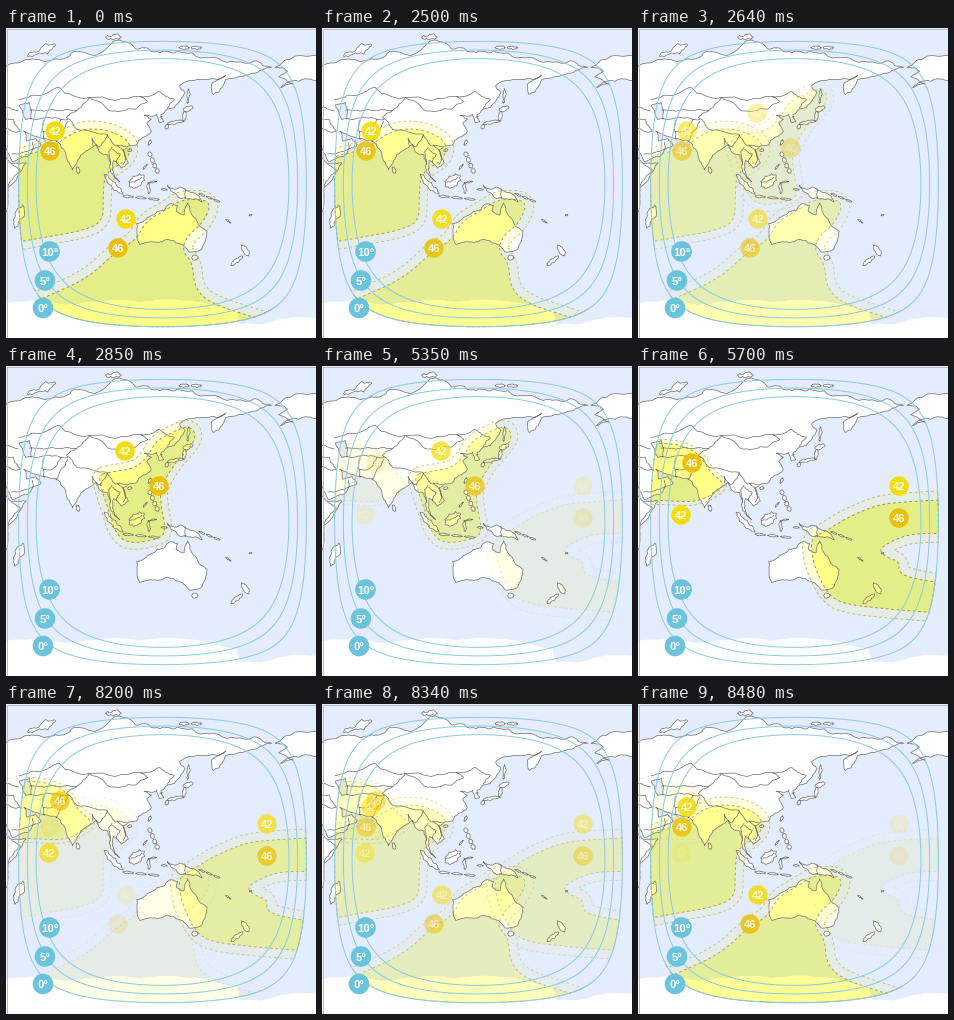
A matplotlib script for the animation above (8550 ms loop, 310 px wide and 310 px high).

```python
import numpy as np
import matplotlib.pyplot as plt
from matplotlib.animation import FuncAnimation
from matplotlib.patches import Circle, PathPatch, Rectangle
from matplotlib.path import Path

SIZE, LOOP, TICK, STEP = 310, 8550, 25, 70
CHANGES = ((2500, 1), (5350, 2), (8200, 2))     # start time, first fade step
PT = 0.72                                       # points per pixel at 100 dpi
CX, CY, SX, SY, SAT_LON = 156.5, 156, 1.77, 1.755, 128.3

SEA, COAST, RING, BLUE = "#e4edfe", "#757575", "#8ccbe2", "#6cc3dc"
# sea tint, land tint, dash colour, badge colour
OUTER = ("#e4ece4", "#ffffd8", "#c4b26c", "#f5dc00")
INNER = ("#e4ee88", "#ffff88", "#a08a3a", "#ebc000")

rng = np.random.default_rng(7)


# ---- geometry ----
def project(lon, lat):
    return np.column_stack([CX + SX * (lon - SAT_LON), CY - SY * lat])


def ring(xy):
    return Path(np.vstack([xy, xy[:1]]), closed=True)


def rim(elevation):
    """Where a geostationary satellite is seen at the given elevation."""
    el = np.radians(elevation)
    gamma = np.arccos(0.1513 * np.cos(el)) - el
    b = np.linspace(0, 2 * np.pi, 240, endpoint=False)
    lat = np.arcsin(np.sin(gamma) * np.cos(b))
    lon = np.arctan2(np.sin(gamma) * np.sin(b), np.cos(gamma))
    return project(SAT_LON + np.degrees(lon), np.degrees(lat))


HORIZON = rim(0) - (CX, CY)


def clamp(xy):
    """Pull points beyond the horizon back onto it."""
    d = xy - (CX, CY)
    limit = np.interp(np.arctan2(d[:, 1], d[:, 0]),
                      np.arctan2(HORIZON[:, 1], HORIZON[:, 0]),
                      np.hypot(*HORIZON.T), period=2 * np.pi)
    return (CX, CY) + d * np.minimum(1, limit / np.hypot(*d.T))[:, None]


def between(xy, *shares):
    nxt = np.roll(xy, -1, axis=0)
    return np.stack([xy + s * (nxt - xy) for s in shares], 1).reshape(-1, 2)


def contour(*xy):
    """Dense smooth outline through a few key pixels."""
    xy = np.reshape(xy, (-1, 2)).astype(float)
    for _ in range(2):
        xy = between(xy, 0.25, 0.75)
    return between(xy, 0, 0.25, 0.5, 0.75)


def grow(xy, d):
    """Parallel outline at distance d outside."""
    tangent = np.roll(xy, -1, axis=0) - np.roll(xy, 1, axis=0)
    normal = np.column_stack([tangent[:, 1], -tangent[:, 0]])
    normal /= np.hypot(*normal.T)[:, None]
    x, y = xy.T
    turn = np.sign(np.sum(x * np.roll(y, -1) - y * np.roll(x, -1)))
    out = xy + turn * d * normal
    gap = np.hypot(*(out[:, None] - xy[None]).transpose(2, 0, 1)).min(axis=1)
    return out[gap > 0.95 * d]


# ---- map ----
def rough(z, rounds=3, amount=0.13):
    """Fractal midpoint displacement of a complex polyline."""
    for _ in range(rounds):
        a, b = z[:-1], z[1:]
        mid = (a + b) / 2 + 1j * (b - a) * rng.uniform(-amount, amount, len(a))
        z = np.append(np.column_stack([a, mid]).ravel(), z[-1])
    return z


def on_map(z):
    lat = z.imag
    return project(z.real, lat + 0.015 * np.maximum(lat - 60, 0) ** 2)


def points(lonlat):
    return np.array(lonlat[::2]) + 1j * np.array(lonlat[1::2])


lands, borders = [], []


def land(*lonlat):
    z = points(lonlat)
    lands.append(ring(on_map(rough(np.append(z, z[0])))))


def border(*lonlat):
    borders.append(Path(on_map(rough(points(lonlat)))))


def isles(start, end, width, n=1):
    """A row of n long islands from start to end."""
    a, b = complex(*start), complex(*end)
    span = (b - a) / n
    turn = np.exp(-1j * np.linspace(0, 2 * np.pi, 9))
    half = 0.5 if n == 1 else 0.42
    for k in range(n):
        oval = span * half * turn.real + 1j * span / abs(span) * width / 2 * turn.imag
        lands.append(ring(on_map(rough(a + span * (k + 0.5) + oval, 2, 0.2))))


# Eurasia, clockwise from the White Sea
land(30, 65, 38, 65, 46, 68, 60, 69, 68, 70, 73, 70, 81, 73, 104, 77.5, 113, 74, 127, 72.5,
     140, 72.5, 160, 70, 180, 69, 190, 66, 179, 63, 164, 59.5, 162, 55, 157, 51, 156, 57,
     164, 62, 154, 59.5, 138, 56, 141, 52, 135, 43.5, 127.5, 39.7, 129, 35.5, 126.5, 35,
     125, 39.7, 118, 39, 122, 37, 119.5, 35, 122, 30, 113.5, 22.2, 106, 19.5, 109, 12,
     105, 9, 100.5, 13.4, 100, 8, 104, 1.4, 98.5, 9, 97.5, 16.5, 94.4, 17, 91, 22.5,
     82, 16.5, 80, 13, 77.5, 8, 73, 19, 67, 25, 57, 27, 50, 30, 51.5, 24.5, 56.5, 26,
     59.8, 22.4, 52, 15.6, 43.5, 12.8, 36, 26, 30, 26)
# Caspian Sea: opposite winding leaves a hole
land(47.5, 45, 49.5, 40, 51, 36.8, 54, 37, 53, 46.5)
# Africa, Alaska
land(30, 20, 37, 21, 43.2, 11.5, 51.2, 11.9, 41, -2, 40.5, -15, 35, -24, 30, -30)
land(220, 70, 203, 71, 192, 66, 199, 64, 194, 61, 202, 57, 195, 55, 209, 60, 220, 59)
# New Guinea, Australia
land(131, -0.8, 135, -3, 138, -1.7, 146, -5, 150.7, -10.3, 143, -8.5, 138, -8, 133, -4)
land(113.7, -22.5, 122, -18, 129, -14.9, 132, -11.5, 136.8, -12.2, 136, -15.5, 140.5, -17.5,
     142.5, -10.7, 146, -19, 153.5, -27, 150, -37.5, 143.5, -38.8, 138, -34, 131, -31.5,
     124, -33, 115.5, -34.5)

isles((44.8, -25.3), (49.5, -12), 4)            # Madagascar
isles((80, 9.8), (81, 6), 2)                    # Sri Lanka
isles((95.3, 5.6), (106, -5.8), 3)              # Sumatra
isles((105.3, -6.8), (127, -9), 1.2, 3)         # Java to Timor
isles((109.5, -1.5), (118, 5), 7)               # Borneo
isles((120.4, 0.6), (120.6, -5.5), 1.6)         # Sulawesi
isles((120, 0.5), (125, 1.5), 0.9)
isles((127.5, -3), (131, -3.3), 0.8)            # Seram
isles((120.5, 18.5), (126, 5.8), 2.4, 4)        # Philippines
isles((117.3, 8.4), (119.7, 11.3), 0.6)
isles((120.3, 22), (121.7, 25.2), 1.3)          # Taiwan
isles((108.6, 19), (111, 19.5), 1.6)            # Hainan
isles((130.5, 31.3), (131, 34), 2)              # Japan
isles((131, 34.2), (140, 36), 1.8)
isles((140.3, 35.5), (141, 41.4), 2)
isles((140, 42), (145.5, 44), 2.8)
isles((142.5, 46), (143, 54.3), 1.3)            # Sakhalin
isles((148.5, -5.3), (161, -10.3), 0.9, 3)      # Solomon Sea
isles((164, -20.2), (167, -22.3), 0.7)          # New Caledonia
isles((177.3, -18), (178.8, -17.5), 0.8)        # Fiji
isles((173, -34.6), (177, -41), 2.6)            # New Zealand
isles((173.5, -41), (167, -46.5), 2.5)
isles((144.8, -42), (148.3, -42), 3)            # Tasmania
isles((52, 71), (68, 75.5), 2.5)                # Arctic islands
isles((96, 78.5), (105, 78.5), 2)
isles((137, 74.5), (151, 74.5), 1.3, 2)

# Russia, Mongolia, China, Central Asia
border(47, 48, 61, 51, 70, 55, 87, 49.3, 116, 49.8, 126, 52.8, 135, 48.3, 131, 43)
border(87, 49.3, 97, 42.7, 105, 41.6, 120, 47, 116, 49.8)
border(87, 49.3, 80, 42, 74, 38, 80, 31, 97, 28.3, 101.5, 21.8, 108, 21.6)
border(53, 42, 66, 42.5, 80, 42)
border(54, 37.3, 66, 37.5, 75, 37)
# Iran, Pakistan, India
border(61, 36.5, 61.5, 25.1)
border(61, 29.8, 66, 30, 71, 37)
border(75, 36, 70, 28, 68, 23.8)
border(89, 22, 88.5, 26, 92.3, 21, 97, 28)
# Indochina, Arabia, islands
border(100, 21, 97.8, 18.5, 98.8, 11)
border(100, 20, 104.5, 17, 102.5, 12)
border(102.5, 22.5, 107.5, 15.5, 106, 11)
border(38, 36.8, 44, 37, 48, 30, 39, 32)
border(43, 17, 55, 20, 55, 24)
border(40, 43.5, 47, 41.5)
border(126.7, 37.8, 128.3, 38.5)
border(109.6, 1, 115, 2.5, 117, 4)
border(141, -2.6, 141, -8.5)
border(43, 11, 48, 8, 41, -1.5)

coast = Path.make_compound_path(*lands, *borders)
antarctica = ring(on_map(rough(points((
    30, -69, 57, -66.5, 74, -69, 100, -66, 130, -66, 170, -72, 172, -80, 184, -80,
    195, -77, 220, -76, 220, -95, 30, -95)), 3, 0.05)))
solid = Path.make_compound_path(*lands, antarctica)

# ---- drawing ----
fig = plt.figure(figsize=(SIZE / 100, SIZE / 100), dpi=100, facecolor=SEA)
ax = fig.add_axes([0, 0, 1, 1])
ax.set(xlim=(0, SIZE), ylim=(SIZE, 0))
ax.axis("off")


def shape(path, z, fill="none", line="none", width=0.0, **kw):
    return ax.add_patch(PathPatch(path, fc=fill, ec=line, lw=width * PT, zorder=z, **kw))


def badge(x, y, text, color, r=9.7):
    disc = ax.add_patch(Circle((x, y), r, fc=color, ec="none", zorder=8))
    label = ax.text(x, y + 0.4, text, color="white", size=11.2 * PT, weight="bold",
                    family="Liberation Sans", ha="center", va="center_baseline", zorder=9)
    return [disc, label]


def scene(areas, margins, marks42, marks46):
    """Two nested coverage contours with their badges."""
    outer = [grow(a, d) for a, d in zip(areas, margins)]
    parts = []
    for k, (group, style) in enumerate(((outer, OUTER), (areas, INNER))):
        sea, ground, dash, _ = style
        path = Path.make_compound_path(*[ring(clamp(a)) for a in group])
        tint = shape(path, 3 + 0.1 * k, ground)
        tint.set_clip_path(solid, ax.transData)
        parts += [shape(path, 1 + 0.1 * k, sea), tint,
                  shape(path, 5, line=dash, width=0.9, ls=(0, (3, 3)))]
    for marks, text, style in ((marks42, "42", OUTER), (marks46, "46", INNER)):
        for x, y in marks:
            parts += badge(x, y, text, style[3])
    return parts


shape(solid, 2, "white")
shape(coast, 4, line=COAST, width=0.75, joinstyle="round")
for elevation in (0, 5, 10):
    shape(ring(rim(elevation)), 6, line=RING, width=1.0)
badge(43.5, 223.5, "10°", BLUE, 10.3)
badge(39, 252.5, "5°", BLUE, 10.3)
badge(37, 280, "0°", BLUE, 10.3)
ax.add_patch(Rectangle((0.5, 0.5), SIZE - 1, SIZE - 1, fc="none", ec="#bdbdbd",
                       lw=PT, zorder=10))

south = scene(
    [contour(-30, 137, 44, 122, 62, 107, 82, 100, 106, 103, 125, 114, 122, 132, 99, 144,
             97, 170, 97, 194, 75, 203, 45, 208, -30, 222),
     contour(10, 282, 42, 268, 82, 250, 112, 222, 130, 212, 140, 193, 160, 182, 176, 171,
             206, 172, 198, 194, 181, 208, 176, 222, 187, 236, 188, 258, 202, 274,
             240, 287, 290, 302, 250, 330, 10, 330)],
    (8, 9), [(49, 103), (120, 191)], [(44, 123), (112, 220)])

east = scene(
    [contour(92, 109, 105, 106, 130, 102, 142, 90, 150, 75, 165, 67, 183, 59, 191, 70,
             181, 85, 169, 97, 154, 122, 155, 140, 160, 165, 153, 173, 122, 178, 109, 166,
             104, 148, 97, 128)],
    (7,), [(119, 85)], [(153, 120)])

west = scene(
    [contour(-20, 77, 32, 77, 52, 82, 64, 92, 72, 106, 87, 118, 78, 127, 58, 136, 35, 135,
             -20, 133),
     contour(340, 132, 262, 136, 240, 139, 222, 146, 205, 154, 188, 165, 173, 172, 174, 190,
             179, 207, 190, 228, 205, 238, 250, 243, 275, 245, 340, 250, 340, 222, 275, 213,
             260, 206, 262, 196, 248, 191, 240, 183, 262, 171, 282, 167, 340, 168)],
    (4, 9), [(43, 149), (261, 120)], [(54, 97), (261, 152)])

scenes = [south, east, west]


def weights(t):
    """Opacity of each scene; the new one starts a step after the old one."""
    w = [1.0, 0.0, 0.0]
    for k, (start, first) in enumerate(CHANGES):
        if t >= start:
            n = (t - start) // STEP
            fading = n < 5
            w = [0.0] * 3
            w[k] = 1 - (first + n) / 7 if fading else 0.0
            w[(k + 1) % 3] = (first + n - 1) / 6 if fading else 1.0
    return w


def draw(i):
    for parts, w in zip(scenes, weights(i * TICK + TICK - 1)):
        for part in parts:
            part.set_alpha(w)
            part.set_visible(w > 0)
    return [part for parts in scenes for part in parts]


anim = FuncAnimation(fig, draw, frames=LOOP // TICK, interval=TICK, repeat=True,
                     repeat_delay=0, blit=False)
plt.show()
```
